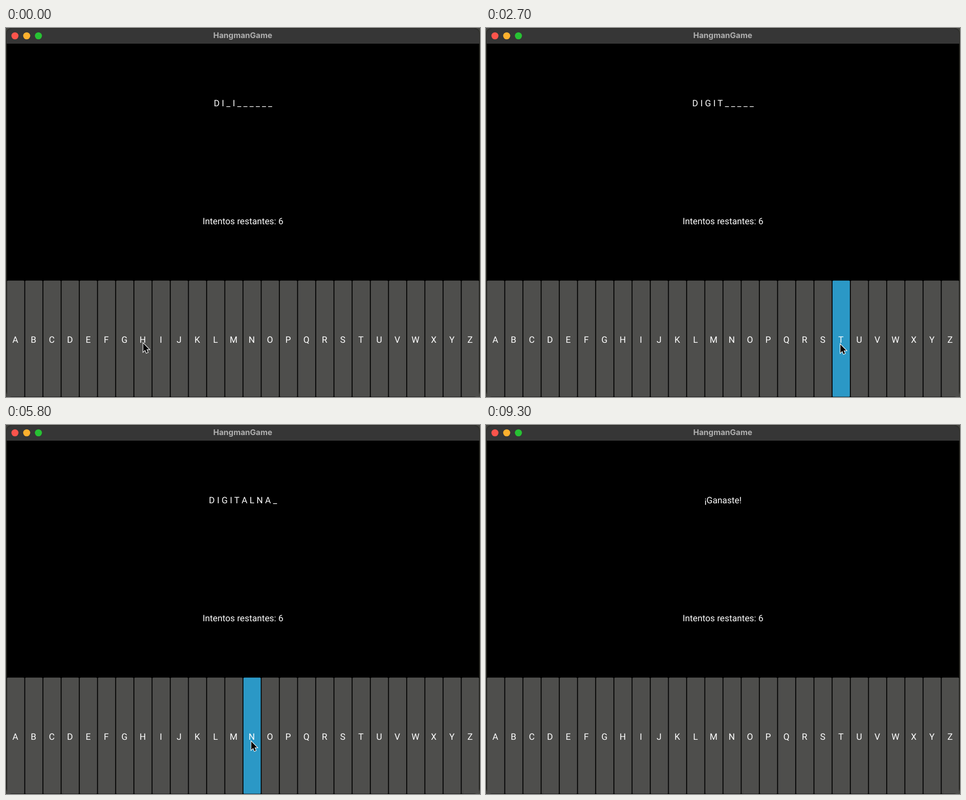
These frames come from a looping animation (848x660 px, 9400 ms). An HTML page with a canvas:

```html
<!DOCTYPE html>
<html lang="es">
<head>
<meta charset="utf-8">
<title>HangmanGame</title>
<style>
  html, body { margin: 0; width: 100%; height: 100%; overflow: hidden; background: #000; }
  canvas { display: block; }
</style>
</head>
<body>
<canvas id="stage" width="848" height="660"></canvas>
<script>
const ctx = document.getElementById('stage').getContext('2d');
const LOOP = 9400, STEP = 100, HOLD = 200, PITCH = 846 / 26;
const LETTERS = 'ABCDEFGHIJKLMNOPQRSTUVWXYZ';
const WORD = 'DIGITALNAE', KNOWN = 'DI';

// When each key goes down
const presses = Object.entries({ G: 600, T: 2600, A: 3200, L: 5400, N: 5800, E: 8200 });
const keyCenter = letter => 1 + PITCH * (LETTERS.indexOf(letter) + 0.5);

// The pointer rests on every pressed key and wanders in between: time, x, y
const wander = [
  [0, 245, 563], [900, 227, 561], [3800, 558, 574], [4000, 667, 576],
  [6400, 110, 569], [9000, keyCenter('E') - 2, 566], [9300, 560, -40], [LOOP, 560, -40]
];
const rests = presses.flatMap(([letter, down]) =>
  [down, down + HOLD].map(time => [time, keyCenter(letter) - 2, 565]));
const path = [...wander, ...rests].sort((a, b) => a[0] - b[0]);

function pointerAt(t) {
  const i = path.findIndex(stop => stop[0] > t);
  const [t0, x0, y0] = path[i - 1], [t1, x1, y1] = path[i];
  const u = (t - t0) / (t1 - t0), k = u * u * (3 - 2 * u);
  return [x0 + (x1 - x0) * k, y0 + (y1 - y0) * k];
}

function messageAt(t) {
  const found = KNOWN + presses.filter(([, down]) => down <= t).map(p => p[0]).join('');
  const shown = [...WORD].map(c => found.includes(c) ? c : '_');
  return shown.includes('_') ? shown.join(' ') : '¡Ganaste!';
}

function box(x, y, w, h, r, color) {
  ctx.fillStyle = color;
  ctx.beginPath();
  ctx.roundRect(x, y, w, h, r);
  ctx.fill();
}

function text(str, x, y, color = '#fff', font = '15.86px Roboto, sans-serif') {
  ctx.font = font;
  ctx.fillStyle = color;
  ctx.fillText(str, x, y);
}

function drawWindow() {
  box(0, 0, 848, 660, 0, '#42423e');
  box(0, 0, 848, 660, 10, '#2b2b25');
  box(1.5, 1, 845, 659, 9, '#000');
  box(1, 1, 846, 27, [9, 9, 0, 0], '#363636');
  ['#fc544c', '#fdb02e', '#27c233'].forEach((color, i) =>
    box(9.7 + 21 * i, 7.7, 12.6, 12.6, 6.3, color));
  text('HangmanGame', 423.5, 18, '#b0b0b0', 'bold 14px Inter, sans-serif');
}

function drawKeys(t) {
  const pressed = presses.find(([, down]) => t >= down && t < down + HOLD);
  [...LETTERS].forEach((letter, i) => {
    const color = pressed && pressed[0] === letter ? '#2b98c6' : '#4e4e4c';
    box(1.8 + PITCH * i, 451.7, PITCH - 1.6, 207.9, 1.5, color);
    text(letter, keyCenter(letter) - 0.5, 563);
  });
}

function drawPointer(x, y) {
  ctx.save();
  ctx.translate(x + 0.5, y + 1);
  ctx.beginPath();
  [[0, 0], [0, 15], [3.4, 11.8], [5.7, 17.2], [8.2, 16.1], [5.9, 10.8], [10.5, 10.8]]
    .forEach(([px, py]) => ctx.lineTo(px, py));
  ctx.closePath();
  ctx.strokeStyle = '#fff';
  ctx.lineWidth = 2;
  ctx.stroke();
  ctx.fillStyle = '#000';
  ctx.fill();
  ctx.restore();
}

function draw(now) {
  const t = Math.floor((now % LOOP) / STEP) * STEP;
  ctx.textAlign = 'center';
  ctx.textRendering = 'geometricPrecision';
  drawWindow();
  text(messageAt(t), 424, 140);
  text('Intentos restantes: 6', 424, 351);
  drawKeys(t);
  drawPointer(...pointerAt(t));
  requestAnimationFrame(draw);
}
requestAnimationFrame(draw);
</script>
</body>
</html>
```
